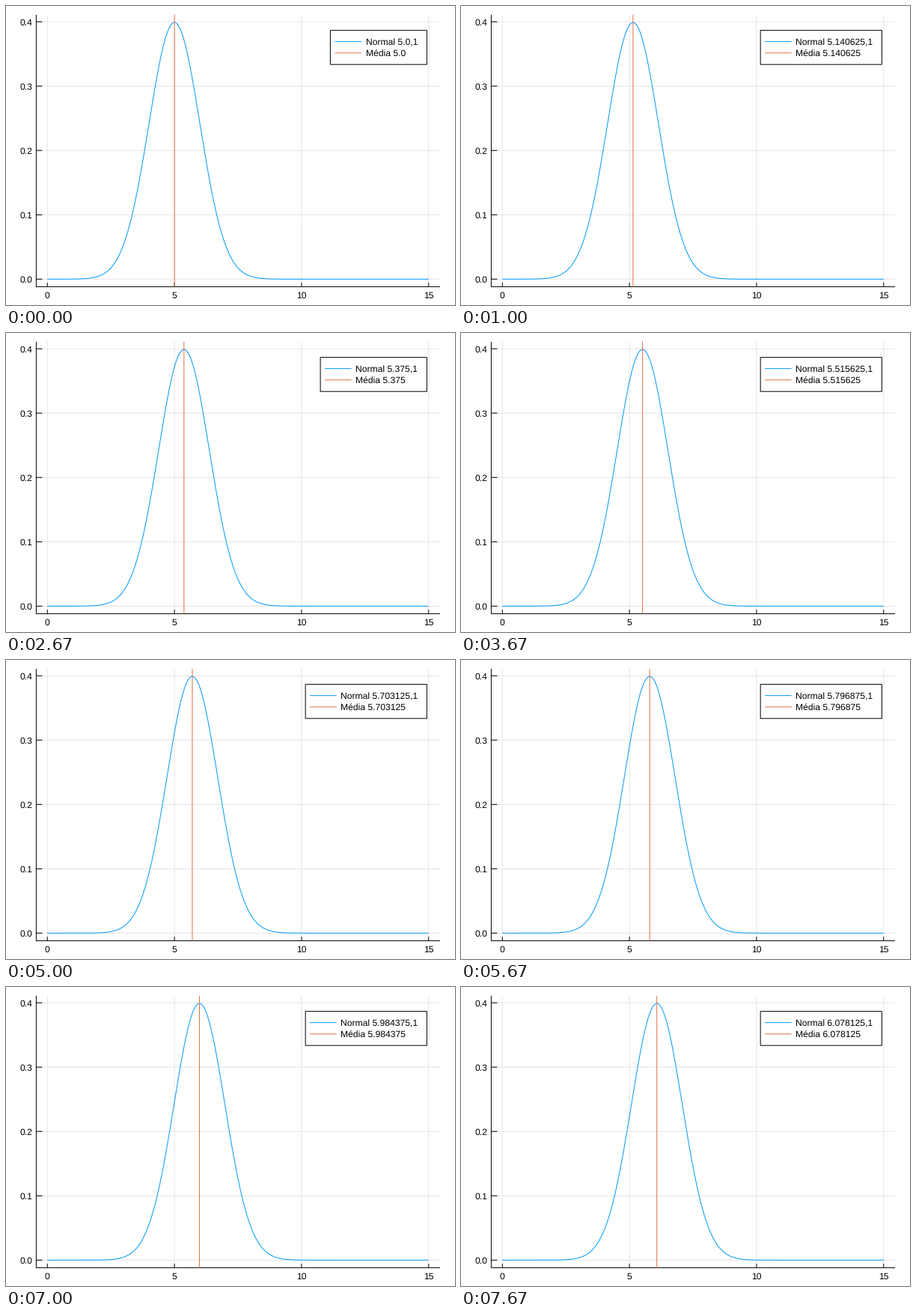
Recreate the animation shown at these times as a matplotlib script. Size 600x400 px, loop 8 s.

```python
import numpy as np
import matplotlib.pyplot as plt
from matplotlib.animation import FuncAnimation
from matplotlib.patches import Rectangle

WIDTH, HEIGHT, DPI = 600, 400, 100
FRAMES, LOOP_MS = 24, 8000
START, STEP = 5.0, 3 / 64
LEFT, RIGHT, TOP, BOTTOM = 40.4, 580, 11.7, 375.6
LEGEND_RIGHT, LEGEND_TOP, LEGEND_BOTTOM = 562.4, 32.6, 78.2
BLUE, ORANGE, GRID = "#009af9", "#e26f46", "#e5e5e5"
PX = 72 / DPI

plt.rcParams["font.family"] = "Liberation Sans"
plt.rcParams["font.size"] = 12.1 * PX
plt.rcParams["text.hinting"] = "none"
plt.rcParams["lines.solid_capstyle"] = "butt"

fig = plt.figure(figsize=(WIDTH / DPI, HEIGHT / DPI), dpi=DPI, facecolor="white")
ax = fig.add_axes([0, 0, 1, 1])
ax.set_xlim(0, WIDTH)
ax.set_ylim(HEIGHT, 0)
ax.axis("off")


def to_x(value):
    return 55.28 + 33.962 * value


def to_y(value):
    return 365.4 - 860.8 * value


def line(xs, ys, color, order):
    return ax.plot(xs, ys, color=color, lw=PX, zorder=order, snap=False)[0]


def label(x, y, text, align):
    return ax.text(x, y, text, ha=align, va="baseline", zorder=6)


def draw_axes():
    for value in (0, 5, 10, 15):
        x = to_x(value)
        line([x, x], [TOP, BOTTOM], GRID, 1)
        line([x, x], [BOTTOM, BOTTOM - 5.4], "black", 2)
        label(x, 390.4, str(value), "center")
    for value in (0, 0.1, 0.2, 0.3, 0.4):
        y = to_y(value)
        line([LEFT, RIGHT], [y, y], GRID, 1)
        line([LEFT, LEFT + 8], [y, y], "black", 2)
        label(35.3, y + 4.4, f"{value:.1f}", "right")
    line([LEFT, LEFT, RIGHT], [TOP, BOTTOM, BOTTOM], "black", 2)


draw_axes()
grid_x = np.linspace(0, 15, 601)
curve = line([], [], BLUE, 3)
mean_line = line([], [], ORANGE, 4)

box = ax.add_patch(Rectangle((0, LEGEND_TOP), 1, LEGEND_BOTTOM - LEGEND_TOP,
                             facecolor="white", edgecolor="black", lw=PX,
                             zorder=5, snap=False))
rows = [(line([], [], color, 6), label(0, y + 4.4, "", "left"), y)
        for color, y in ((BLUE, 47.6), (ORANGE, 62.8))]


def update(frame):
    mean = START + STEP * frame
    density = np.exp(-(grid_x - mean) ** 2 / 2) / np.sqrt(2 * np.pi)
    curve.set_data(to_x(grid_x), to_y(density))
    mean_line.set_data([to_x(mean)] * 2, [TOP, BOTTOM])

    texts = f"Normal {mean},1", f"Média {mean}"
    width = 129 + 6.65 * (len(texts[0]) - 12)
    left = LEGEND_RIGHT - width
    box.set_x(left)
    box.set_width(width)
    for (swatch, caption, y), text in zip(rows, texts):
        swatch.set_data([left + 6, left + 41.5], [y, y])
        caption.set_x(left + 47.3)
        caption.set_text(text)
    return [curve, mean_line, box]


anim = FuncAnimation(fig, update, frames=FRAMES, interval=LOOP_MS // FRAMES,
                     repeat=True, repeat_delay=0, blit=False)
plt.show()
```
